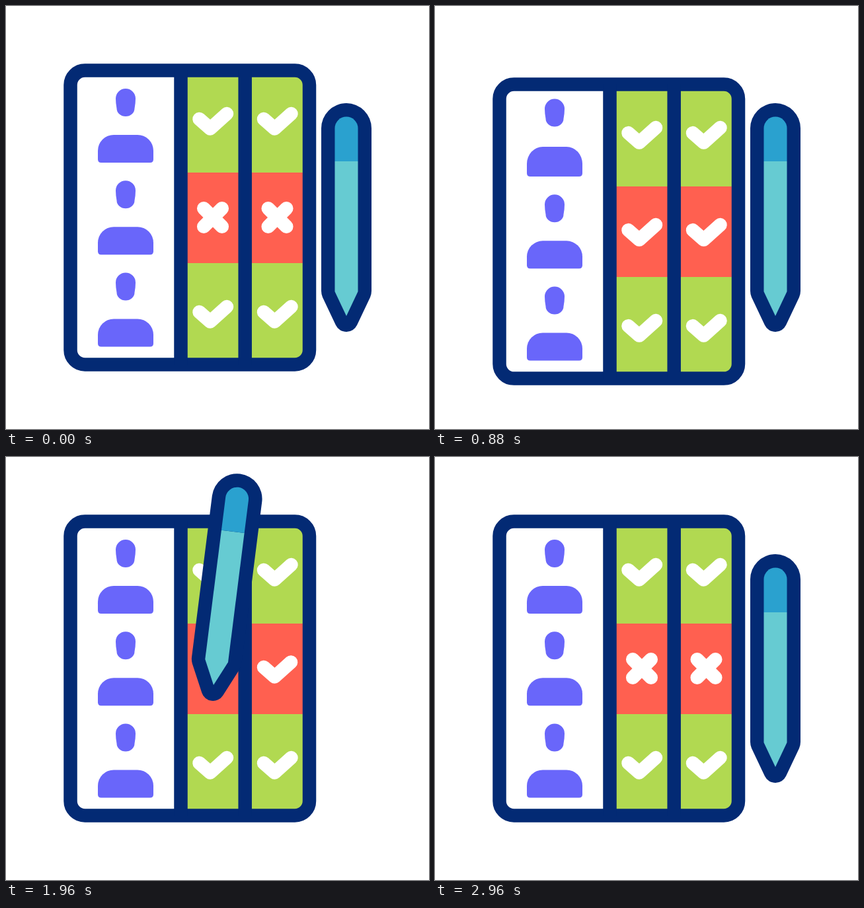
These frames come from a looping animation (640 px wide and 640 px high, 3000 ms). An HTML page:

```html
<!DOCTYPE html>
<html lang="en">
<head>
<meta charset="utf-8">
<title>Checklist</title>
<style>
  html, body { margin: 0; width: 100%; height: 100%; overflow: hidden; background: #fff; }
  svg { display: block; width: 100%; height: 100%; }
  .frame { fill: none; stroke: #032a74; stroke-width: 20.5; }
  .mark { fill: none; stroke: #fff; stroke-width: 20.5; stroke-linecap: round; stroke-linejoin: round; }
</style>
</head>
<body>
<svg viewBox="0 0 640 640">
  <g id="board">
    <path fill="#b1d951" d="M264.5 97H459V543H264.5z"/>
    <path fill="#ff6050" d="M264.5 252H459V389H264.5z"/>
    <g id="people" fill="#6966fa"></g>
    <g id="marks"></g>
    <rect class="frame" x="97.5" y="97.5" width="361.5" height="445" rx="22"/>
    <path class="frame" d="M264.5 97V543M361.7 97V543"/>
  </g>
  <g id="pen">
    <path fill="#032a74" d="M477 185a38 38 0 0 1 76 0V431q0 5-2 9.8L531.1 482.8A17.8 17.8 0 0 1 498.9 482.8L479 440.8q-2-4.8-2-9.8z"/>
    <path fill="#66cbd2" d="M497.5 235H532.5V432L515 469 497.5 432z"/>
    <path fill="#2aa1cf" d="M497.5 235V185a17.5 17.5 0 0 1 35 0V235z"/>
  </g>
</svg>
<script>
const LOOP = 3000;
const ROW = 139.2;
const HOME = { x: 515, y: 469 };
const HEAD = 'M166 140a15 15 0 0 1 30 0q0 7-1.5 15a13.5 12 0 0 1-27 0q-1.5-8-1.5-15z';
const BODY = 'M139 219a24 24 0 0 1 24-24h36a24 24 0 0 1 24 24v13q0 5-5 5h-74q-5 0-5-5z';

const byId = id => document.getElementById(id);
const move = (el, value) => el.setAttribute('transform', value);

// Progress from 0 to 1 between two times
const linear = (t, from, to) => Math.min(1, Math.max(0, (t - from) / (to - from)));
const ramp = (t, from, to) => (1 - Math.cos(Math.PI * linear(t, from, to))) / 2;

function add(parent, tag, attrs = {}) {
  const el = document.createElementNS('http://www.w3.org/2000/svg', tag);
  for (const name in attrs) el.setAttribute(name, attrs[name]);
  return parent.appendChild(el);
}

const people = [0, 1, 2].map(row => {
  const g = add(byId('people'), 'g', { transform: `translate(0 ${row * ROW})` });
  return { head: add(g, 'path', { d: HEAD }), body: add(g, 'path', { d: BODY }) };
});
const jumpers = [people[0], people[2]];

const addMark = (d = '') => add(byId('marks'), 'path', { d, class: 'mark', pathLength: 1 });
const addCheck = (x, y) => addMark(`M${x - 20.5} ${y - 3}l16.5 14.5 25-22.5`);

const cells = [313, 410.5].map(x => {
  addCheck(x, 174);
  addCheck(x, 466);
  return { x, check: addCheck(x, 321), cross: addMark() };
});

function drawPerson({ head, body }, t) {
  const dy = -5.5 * ramp(t, 720, 880) + 21.5 * ramp(t, 880, 1100) - 16 * ramp(t, 1100, 1560);
  const stretch = 1 - dy * (dy < 0 ? 0.55 : 0.38) / 42;
  move(head, `translate(0 ${dy})`);
  move(body, `translate(0 237) scale(1 ${stretch}) translate(0 -237)`);
}

function drawCell({ x, check, cross }, i, t) {
  const late = t - 80 * i;
  const open = 1 - linear(late, 40, 360) + linear(late, 2360, 2680);
  const arm = 13.8 * open;
  cross.style.display = open > 0 ? '' : 'none';
  cross.setAttribute('d', `M${x - arm} ${320 - arm}l${2 * arm} ${2 * arm}m0 ${-2 * arm}l${-2 * arm} ${2 * arm}`);

  const drawn = ramp(late, 440, 760) - ramp(t - 300 * i, 1640, 1960);
  check.style.display = drawn > 0 ? '' : 'none';
  check.setAttribute('stroke-dasharray', `${drawn} 2`);
}

function drawPen(t) {
  const out = ramp(t, 1200, 1600);
  const back = ramp(t, 2560, 2960);
  const dx = -201 * out + 105 * ramp(t, 2000, 2300) + 96 * ramp(t, 2400, 2920);
  const dy = -124 * (out - back);
  const tilt = -11.7 * (out - back) * Math.cos(2 * Math.PI * (t - 1600) / 560);
  move(byId('pen'), `translate(${dx} ${dy}) rotate(${tilt} ${HOME.x} ${HOME.y})`);
}

function draw(t) {
  const bob = 38.4 * (ramp(t, 0, 600) - ramp(t, 600, 1200));
  move(byId('board'), `translate(0 ${bob})`);
  jumpers.forEach((person, i) => drawPerson(person, t - 160 * i));
  cells.forEach((cell, i) => drawCell(cell, i, t));
  drawPen(t);
}

const start = performance.now();
function tick(now) {
  draw(Math.max(0, now - start) % LOOP);
  requestAnimationFrame(tick);
}
draw(0);
requestAnimationFrame(tick);
</script>
</body>
</html>
```
